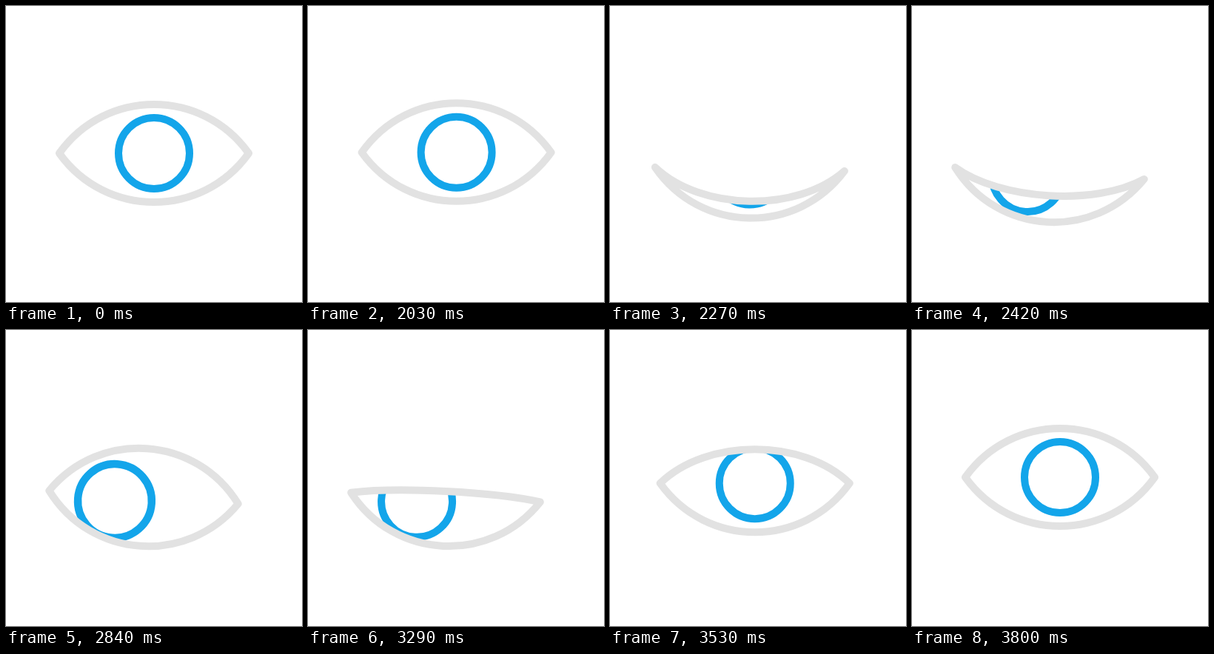
An HTML page for the animation above (3.89 s loop, 400 by 400 pixels).

```html
<!DOCTYPE html>
<html lang="en">
<head>
<meta charset="utf-8">
<title>Blinking eye</title>
<style>
html, body { margin: 0; width: 100%; height: 100%; overflow: hidden; background: #fff; }
svg { display: block; width: 100%; height: 100%; }
</style>
</head>
<body>
<svg viewBox="0 0 400 400" fill="none" stroke-width="10" stroke-linejoin="round">
  <clipPath id="opening"><path id="mask"/></clipPath>
  <g id="eye">
    <g clip-path="url(#opening)"><circle id="iris" r="48" stroke="#13a5ea"/></g>
    <path id="lids" stroke="#e2e2e2"/>
  </g>
</svg>
<script>
const LOOP = 3890, STEP = 30, SAG = 66;
const part = id => document.getElementById(id);
const eye = part('eye'), iris = part('iris'), lids = part('lids'), mask = part('mask');

// Each track is a list of [time, value] keys with smooth easing between them.
const tracks = {
  drop: [[2000, 0], [2090, -4.5], [2335, 27], [3370, 27], [3650, -4], [3800, 0]],
  tilt: [[2150, 0], [2490, 4], [3190, 4], [3470, 0]],
  lid: [[2000, SAG], [2090, 68.5], [2330, -64], [2600, SAG], [3195, SAG],
        [3400, -64], [3575, 67.5], [3800, SAG]],
  look: [[2290, 0], [2480, 1], [3330, 1], [3500, 0]],
  size: [[2520, 1], [2840, 1.04], [3130, 1]]
};

function at(keys, t) {
  const i = keys.findIndex(key => key[0] > t);
  if (i === 0) return keys[0][1];
  if (i < 0) return keys[keys.length - 1][1];
  const [t0, a] = keys[i - 1], [t1, b] = keys[i];
  const u = (t - t0) / (t1 - t0);
  return a + (b - a) * u * u * (3 - 2 * u);
}

// Almond outline: the upper lid rises by `sag`, the lower lid stays fixed.
function outline(sag) {
  const up = -sag * 4 / 3, down = SAG * 4 / 3;
  return `M-128 0C-65 ${up} 65 ${up} 128 0C65 ${down} -65 ${down} -128 0Z`;
}

function draw(time) {
  const t = Math.floor((time % LOOP - 20) / STEP) * STEP + 20;
  const drop = at(tracks.drop, t), look = at(tracks.look, t);
  const shape = outline(at(tracks.lid, t));
  lids.setAttribute('d', shape);
  mask.setAttribute('d', shape);
  eye.setAttribute('transform',
    `translate(${200 - drop * 14 / 27} ${199 + drop}) rotate(${at(tracks.tilt, t)})`);
  iris.setAttribute('transform',
    `translate(${-38.6 * look} ${7.7 * look}) scale(${at(tracks.size, t)})`);
}

const start = performance.now();
function tick() {
  draw(performance.now() - start);
  requestAnimationFrame(tick);
}
tick();
</script>
</body>
</html>
```
